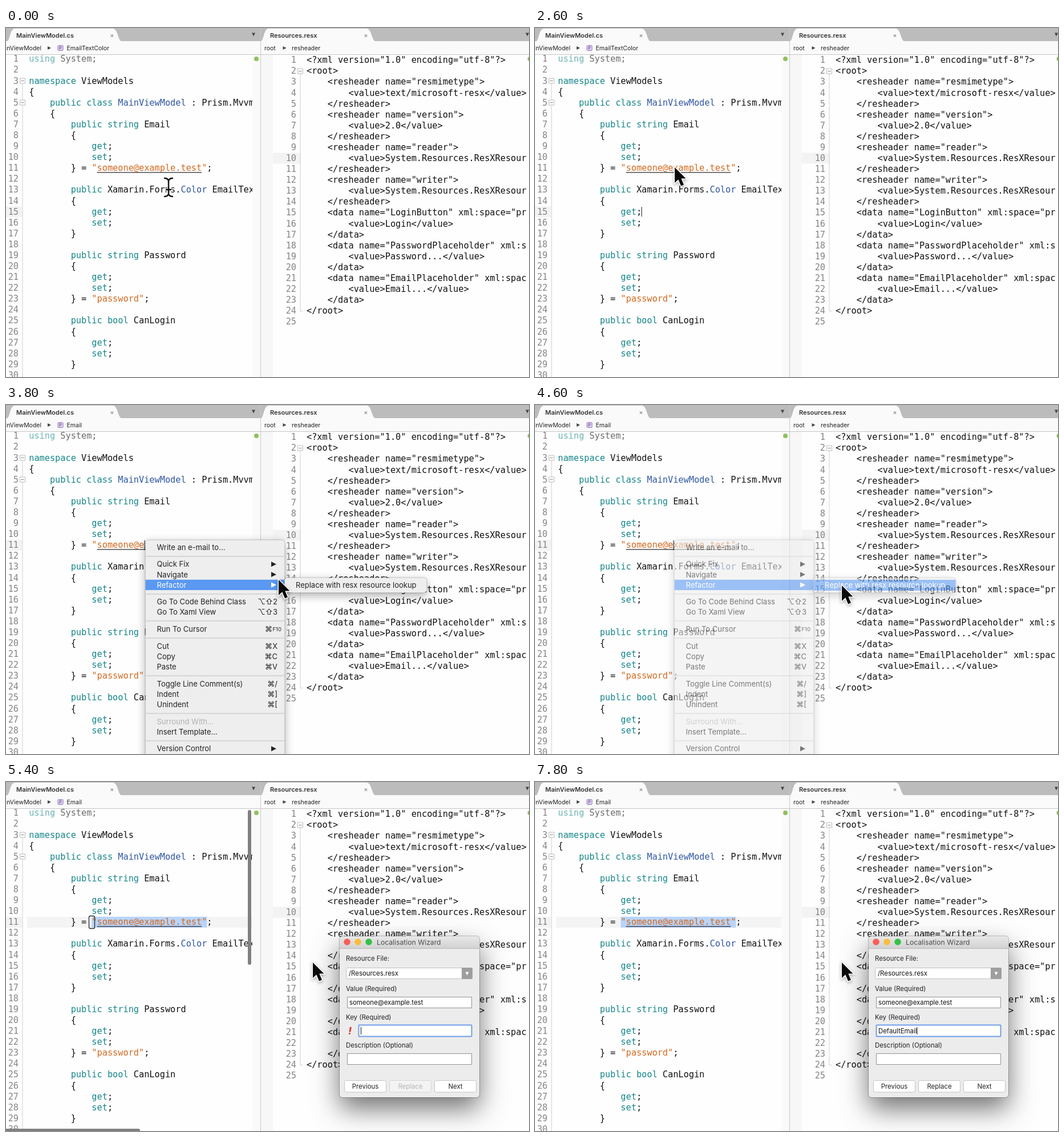
Recreate the animation shown at these times as an HTML page with a canvas. Size 917 px wide and 611 px high, loop 8000 ms.

```html
<!DOCTYPE html>
<html lang="en">
<head>
<meta charset="utf-8">
<title>Localisation wizard</title>
<style>
html, body { margin: 0; width: 100%; height: 100%; overflow: hidden; background: #fff; }
canvas { display: block; }
</style>
</head>
<body>
<canvas id="stage" width="917" height="611"></canvas>
<script>
const W = 917, H = 611, LOOP = 8000, STEP = 200;
const LINE = 19.085, PITCH = 9.181;
const MONO = '15.25px "DejaVu Sans Mono", monospace';
const UI = 'Inter, "DejaVu Sans", sans-serif';
const EMAIL = 'someone@example.test';
const KEY_NAME = 'DefaultEmail';

const screen = document.getElementById('stage').getContext('2d');
const layerCanvas = document.createElement('canvas');
layerCanvas.width = W;
layerCanvas.height = H;
const layer = layerCanvas.getContext('2d');
let g = screen;

const property = (type, name, end = '}') => `        public ${type} ${name}
        {
            get;
            set;
        ${end}
`;
const csharp = `using System;

namespace ViewModels
{
    public class MainViewModel : Prism.Mvvm.BindableBase
    {
${property('string', 'Email', `} = "${EMAIL}";`)}
${property('Xamarin.Forms.Color', 'EmailTextColor')}
${property('string', 'Password', '} = "password";')}
${property('bool', 'CanLogin')}`.split('\n');

const header = (name, value) => `    <resheader name="${name}">
        <value>${value}</value>
    </resheader>`;
const entry = (name, value) => `    <data name="${name}" xml:space="preserve">
        <value>${value}</value>
    </data>`;
const xml = `<?xml version="1.0" encoding="utf-8"?>
<root>
${header('resmimetype', 'text/microsoft-resx')}
${header('version', '2.0')}
${header('reader', 'System.Resources.ResXResourceReader')}
${header('writer', 'System.Resources.ResXResourceWriter')}
${entry('LoginButton', 'Login')}
${entry('PasswordPlaceholder', 'Password...')}
${entry('EmailPlaceholder', 'Email...')}
</root>
`.split('\n');

// '-' is a separator, '>' marks a submenu, a leading '~' a disabled item.
const menuItems = [
  ['Write an e-mail to...'], '-',
  ['Quick Fix', '>'], ['Navigate', '>'], ['Refactor', '>'], '-',
  ['Go To Code Behind Class', '⌥⇧2'], ['Go To Xaml View', '⌥⇧3'], '-',
  ['Run To Cursor', '⌘F10'], '-',
  ['Cut', '⌘X'], ['Copy', '⌘C'], ['Paste', '⌘V'], '-',
  ['Toggle Line Comment(s)', '⌘/'], ['Indent', '⌘]'], ['Unindent', '⌘['], '-',
  ['~Surround With...'], ['Insert Template...'], '-',
  ['Version Control', '>']
];

// Pointer path: time, x, y
const pointerPath = [
  [0, 285, 279], [200, 285, 279], [1000, 272, 308], [1600, 272, 308],
  [2400, 245, 244], [3000, 245, 244], [3400, 305, 313], [3800, 478, 306],
  [4200, 538, 316], [LOOP, 538, 316]
];

function pointerAt(t) {
  const i = Math.max(1, pointerPath.findIndex(p => p[0] >= t));
  const [t0, x0, y0] = pointerPath[i - 1], [t1, x1, y1] = pointerPath[i];
  const u = (t - t0) / (t1 - t0), k = u * u * (3 - 2 * u);
  return [x0 + (x1 - x0) * k, y0 + (y1 - y0) * k];
}

function rect(x, y, w, h, color) {
  g.fillStyle = color;
  g.fillRect(x, y, w, h);
}

function box(x, y, w, h, r, fill, stroke, lineWidth = 1) {
  g.beginPath();
  g.roundRect(x, y, w, h, r);
  if (fill) { g.fillStyle = fill; g.fill(); }
  if (stroke) { g.strokeStyle = stroke; g.lineWidth = lineWidth; g.stroke(); }
}

function text(str, x, y, font, color = '#111', align = 'left') {
  g.font = font;
  g.fillStyle = color;
  g.textAlign = align;
  g.fillText(str, x, y);
}

const ui = (str, x, y, size, color, align) => text(str, x, y, `${size}px ${UI}`, color, align);

function disc(x, y, r, color) {
  g.beginPath();
  g.arc(x, y, r, 0, 7);
  g.fillStyle = color;
  g.fill();
}

function polygon(points, color) {
  g.beginPath();
  points.forEach(([x, y]) => g.lineTo(x, y));
  g.closePath();
  g.fillStyle = color;
  g.fill();
}

const rightArrow = (x, y, s, color) => polygon([[x, y - s / 2], [x + s, y], [x, y + s / 2]], color);
const downArrow = (x, y, s, color) => polygon([[x - s / 2, y - s / 2], [x + s / 2, y - s / 2], [x, y + s / 2]], color);

function withShadow(blur, offset, alpha, draw) {
  g.save();
  g.shadowColor = `rgba(0,0,0,${alpha})`;
  g.shadowBlur = blur;
  g.shadowOffsetY = offset;
  draw();
  g.restore();
}

function clipped(x, y, w, h, draw) {
  g.save();
  g.beginPath();
  g.rect(x, y, w, h);
  g.clip();
  draw();
  g.restore();
}

function tab(x, width, title) {
  const right = x + width;
  g.beginPath();
  g.moveTo(x, 24);
  g.bezierCurveTo(x + 7, 22, x + 5, 1, x + 15, 1);
  g.lineTo(right - 17, 1);
  g.bezierCurveTo(right - 7, 1, right - 9, 22, right, 24);
  g.fillStyle = '#fafafa';
  g.fill();
  text(title, x + 17, 17, `600 11px ${UI}`, '#333');
  ui('×', right - 18, 17, 11, '#777', 'center');
}

function foldBox(x, y) {
  box(x - 4.5, y - 4.5, 9, 9, 0, '#fff', '#bbb');
  rect(x - 2.5, y - .5, 5, 1, '#888');
}

function lineNumbers(count, x, baseline) {
  for (let n = 1; n <= count; n++) text(n, x, baseline + (n - 1) * LINE, MONO, '#858585', 'right');
}

function tokenColor(token) {
  if (token[0] === '"') return '#d2691e';
  if (/^(MainViewModel|Color)$/.test(token)) return '#3056a0';
  if (/^(using|namespace|public|class|string|bool|get|set)$/.test(token)) return '#16868a';
  return '#111';
}

function codeLine(line, x, y) {
  const tokens = line.split(/("[^"]*"|\b(?:using|namespace|public|class|string|bool|get|set|MainViewModel|Color)\b)/);
  for (const token of tokens) {
    text(token, x, y, MONO, tokenColor(token));
    if (token.includes(EMAIL)) rect(x + PITCH, y + 2, EMAIL.length * PITCH, 1.3, '#333');
    x += token.length * PITCH;
  }
}

function chrome(member) {
  rect(0, 0, W, H, '#fefefe');
  rect(0, 0, W, 23, '#bcbcbc');
  rect(0, 23, W, 23, '#fafafa');
  tab(1, 203, 'MainViewModel.cs');
  tab(446, 203, 'Resources.resx');
  downArrow(434, 11.5, 6, '#444');
  downArrow(914, 11.5, 6, '#444');
  rect(0, 46, W, 1, '#c6c6c6');
  ui('inViewModel', 62, 39, 10.5, '#222', 'right');
  rightArrow(73, 35, 6, '#444');
  box(91, 30.5, 9, 9, 1.5, '#e0d4f0', '#8d70b5');
  text('P', 95.5, 38, `600 7.5px ${UI}`, '#7352a0', 'center');
  ui(member, 106.5, 39, 10.5, '#222');
  ui('root', 453, 39, 10.5, '#222');
  rightArrow(485.5, 35, 6, '#444');
  ui('resheader', 501, 39, 10.5, '#222');
}

function leftEditor(t) {
  const selected = t >= 5200;
  const caretLine = t < 3000 ? 15 : 11;
  const top = 49 + (caretLine - 1) * LINE - 4;
  rect(0, top, 28, LINE, '#f3f3f3');
  if (selected) {
    rect(37, top, 395, LINE, '#f4f4f4');
    rect(150.3, top, 22 * PITCH, LINE, '#b9d4fb');
  }
  lineNumbers(30, 22, 59.4);
  rect(28.5, 97, 1, H, '#d0d0d0');
  foldBox(29, 92.5);
  foldBox(29, 130.5);
  clipped(37, 47, 395, H, () => csharp.forEach((line, i) => {
    g.globalAlpha = i ? 1 : .62;
    codeLine(line, 40.2, 59.4 + i * LINE);
  }));
  rect(432, 47, 14, H, '#fafafa');
  disc(439, 54, 4, '#8fc15c');

  if (!selected && t % 1000 >= 500) rect(t < 3000 ? 186.5 : 242.5, top + 1, 1, 17, '#111');
  if (selected && t <= 5400) box(145.5, 234.5, 10, 22, 2.5, null, '#333', 1.4);
  if (selected && t < 6200) {
    g.globalAlpha = t < 6000 ? 1 : .5;
    box(424, 49, 6, 271, 3, '#808080');
    box(-4, 607, 239, 6, 3, '#808080');
    g.globalAlpha = 1;
  }
}

function rightEditor() {
  rect(446, 0, 1, H, '#c8c8c8');
  rect(447, 47, 21, H, '#f7f7f7');
  rect(468, 218.5, 49, LINE, '#f3f3f3');
  lineNumbers(25, 509, 61.3);
  rect(515.5, 80, 1, 415, '#d0d0d0');
  rect(515.5, 495, 5, 1, '#d0d0d0');
  foldBox(516, 75.5);
  clipped(520, 47, 392, H, () => xml.forEach((line, i) => text(line, 527, 61.3 + i * LINE, MONO)));
  disc(918.5, 54, 4, '#8fc15c');
}

function menuPanel(x, y, w, h) {
  withShadow(16, 5, .32, () => box(x, y, w, h, 5, '#eeeeee'));
  box(x - .5, y - .5, w + 1, h + 1, 5, null, 'rgba(0,0,0,.18)');
}

function contextMenu(pointerX, pointerY, subSelected) {
  const BLUE = '#5a98f2';
  let y = 249;
  menuPanel(244.5, 236.5, 244, 420);
  let refactorActive = false;
  for (const item of menuItems) {
    if (item === '-') {
      rect(245, Math.round(y - 3.5), 243, 2, '#d6d6d6');
      y += 11.5;
      continue;
    }
    const [label, key = ''] = item;
    const active = pointerX > 246 && Math.abs(pointerY - y) <= 9.1;
    const disabled = label[0] === '~';
    const color = active ? '#fff' : disabled ? '#b0b0b0' : '#222';
    if (active) rect(244.5, y - 9.1, 244, 18.2, BLUE);
    if (active && label === 'Refactor') refactorActive = true;
    ui(label.replace('~', ''), 264.5, y + 4.7, 13, color);
    if (key === '>') rightArrow(465, y, 9, color);
    else if (key === '⌘F10') {
      ui('⌘', 454, y + 4.7, 13, color);
      ui('F10', 467.5, y + 4, 9.5, color);
    } else ui(key, 476, y + 4.7, 13, color, 'right');
    y += 18.15;
  }
  if (refactorActive) {
    menuPanel(488.5, 302.5, 249, 26);
    if (subSelected) rect(488.5, 306, 249, 19, BLUE);
    ui('Replace with resx resource lookup', 508, 319.8, 13, subSelected ? '#fff' : '#222');
  }
}

function button(x, label, enabled = true) {
  box(x + .5, 522.5, 73, 20.5, 3, enabled ? '#fff' : '#f3f3f3', enabled ? '#c4c4c4' : '#d6d6d6');
  ui(label, x + 37, 537, 11.4, enabled ? '#222' : '#b4b4b4', 'center');
}

function wizard(t) {
  const typed = KEY_NAME.slice(0, Math.max(0, Math.ceil((t - 5800) / 1600 * KEY_NAME.length)));
  withShadow(46, 20, .55, () => box(585, 270, 245, 282, 5, '#ececec'));
  const bar = g.createLinearGradient(0, 270, 0, 291);
  bar.addColorStop(0, '#e8e8e8');
  bar.addColorStop(1, '#d2d2d2');
  box(585, 270, 245, 21, [5, 5, 0, 0], bar);
  rect(585, 291, 245, 1, '#b8b8b8');
  box(584.5, 269.5, 246, 283, 5, null, 'rgba(0,0,0,.22)');
  ['#f85f57', '#f9bd3d', '#35c149'].forEach((color, i) => disc(598 + i * 19, 280, 5.8, color));
  ui('Localisation Wizard', 650, 284.8, 12.2, '#4c4c4c');

  ['Resource File:', 'Value (Required)', 'Key (Required)', 'Description (Optional)']
    .forEach((label, i) => ui(label, 596, [313.3, 366, 415.7, 465.3][i], 11.4, '#222'));

  box(596.5, 325.5, 221, 19, 2, '#fff', '#c0c0c0');
  box(799, 325, 19, 20, [0, 2, 2, 0], '#9e9e9e');
  downArrow(808.5, 335.5, 6, '#fff');
  ui('/Resources.resx', 601, 339, 11.4);
  box(598.5, 376.5, 218, 19, 0, '#fff', '#929292');
  ui(EMAIL, 602, 390.2, 11.4);
  box(598.5, 475.5, 218, 19, 0, '#fff', '#929292');

  const left = typed ? 598 : 618;
  if (!typed) text('!', 603, 442, `italic 700 18px ${UI}`, '#e32a20', 'center');
  box(left + .5, 425.5, 816 - left, 20, 1, '#fff', '#6f9fea', 2);
  ui(typed, 602, 440, 11.4);
  const caretX = typed ? 602 + g.measureText(typed).width : 622;
  if ((t + 700) % 1000 < 600 || (typed && t < 7600)) rect(caretX, 429, 1, 13, '#111');

  button(593, 'Previous');
  button(672, 'Replace', typed !== '');
  button(751, 'Next');
}

function iBeam(x, y) {
  const path = new Path2D('M-7-16Q-1-16 0-11Q1-16 7-16M0-11V11M-7 16Q-1 16 0 11Q1 16 7 16M-4 4H4');
  g.save();
  g.translate(x, y);
  g.lineCap = 'round';
  for (const [color, width] of [['rgba(255,255,255,.85)', 5], ['#111', 2.4]]) {
    g.strokeStyle = color;
    g.lineWidth = width;
    g.stroke(path);
  }
  g.restore();
}

function arrowPointer(x, y) {
  const path = new Path2D('M0 0V27L6.3 21.3L11 32.5L16 30.4L11.3 19.5H19.5Z');
  g.save();
  g.translate(x, y);
  withShadow(5, 2, .35, () => {
    g.strokeStyle = '#fff';
    g.lineWidth = 3;
    g.stroke(path);
  });
  g.fillStyle = '#0a0a0a';
  g.fill(path);
  g.restore();
}

function render(t) {
  const [x, y] = pointerAt(t);
  g = screen;
  chrome(t < 3000 ? 'EmailTextColor' : 'Email');
  leftEditor(t);
  rightEditor();

  if (t >= 3000 && t < 4800) {
    g = layer;
    g.clearRect(0, 0, W, H);
    contextMenu(x, t >= 3400 ? 315 : y, x > 489);
    g = screen;
    g.globalAlpha = t < 4600 ? 1 : .6;
    g.drawImage(layerCanvas, 0, 0);
    g.globalAlpha = 1;
  }
  if (t >= 5200) wizard(t);

  const overLink = t < 3000 && y < 256;
  (overLink || t >= 3000 ? arrowPointer : iBeam)(x, y);
}

function tick(now) {
  render(Math.floor(now % LOOP / STEP) * STEP);
  requestAnimationFrame(tick);
}
requestAnimationFrame(tick);
</script>
</body>
</html>
```
